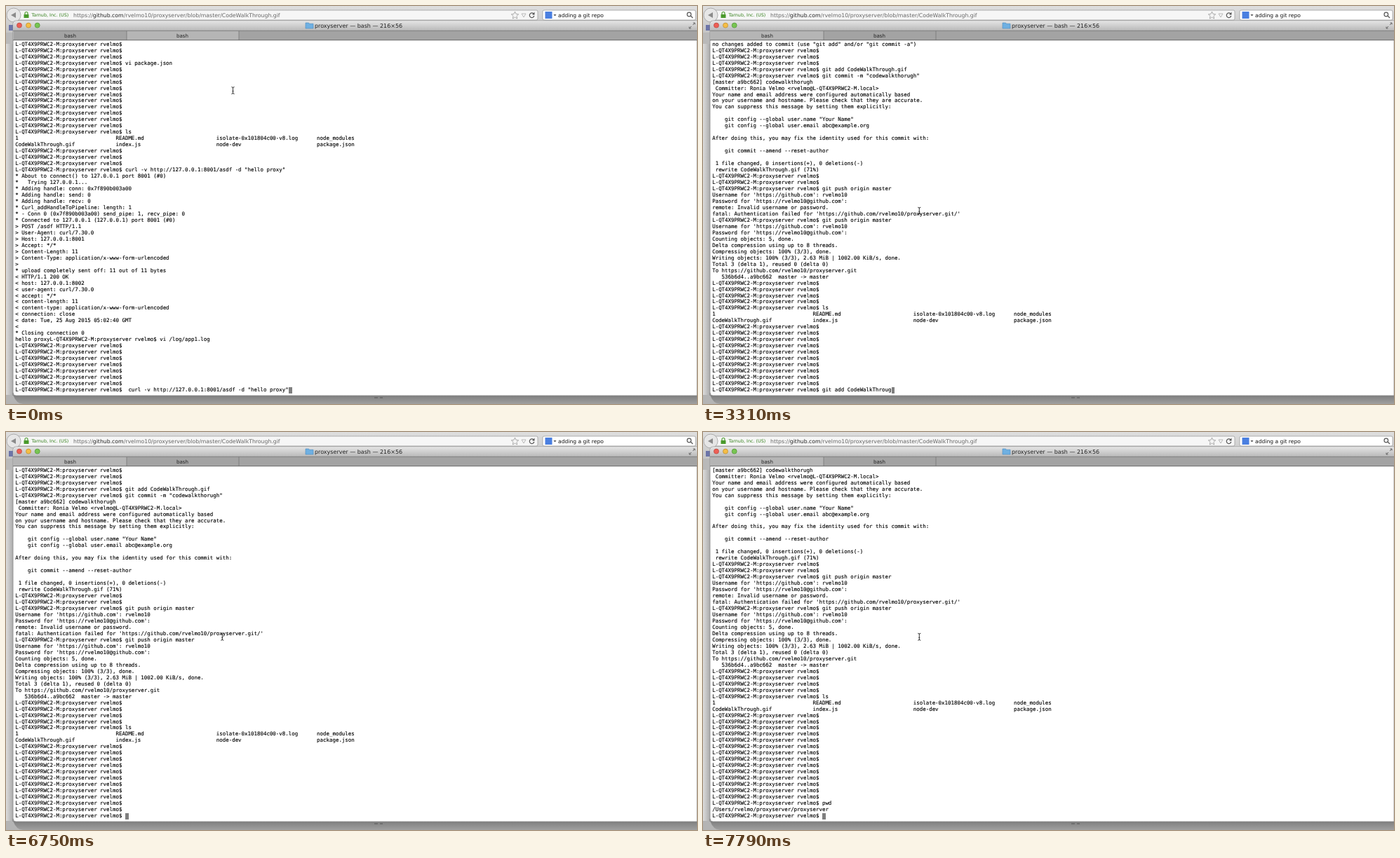
Recreate the animation shown at these times as an HTML page. Size 985 by 568 pixels, loop 8000 ms.

```html
<!DOCTYPE html>
<html lang="en">
<head>
<meta charset="utf-8">
<title>Terminal session</title>
<style>
  html, body { margin: 0; width: 100%; height: 100%; overflow: hidden; background: #ccc; }
  svg, pre, #cursor { position: absolute; }
  svg { left: 0; top: 0; font-family: "DejaVu Sans", sans-serif; text-rendering: geometricPrecision; }
  pre {
    left: 13.2px; top: 50.75px; margin: 0; color: #000;
    font: 7.44px/8.97px "DejaVu Sans Mono", monospace;
    text-rendering: geometricPrecision; font-variant-ligatures: none;
    -webkit-text-stroke: .12px #000;
  }
  #cursor { top: 543.5px; width: 4.7px; height: 9px; background: #7f7f7f; }
</style>
</head>
<body>
<svg width="985" height="568" viewBox="0 0 985 568">
  <defs>
    <linearGradient id="toolbar" x2="0" y2="1"><stop stop-color="#dedede"/><stop offset="1" stop-color="#c4c4c4"/></linearGradient>
    <linearGradient id="titlebar" x2="0" y2="1"><stop stop-color="#e4e4e4"/><stop offset="1" stop-color="#b9b9b9"/></linearGradient>
    <linearGradient id="side"><stop stop-color="#dcdcdc"/><stop offset="1" stop-color="#a8a8a8"/></linearGradient>
    <linearGradient id="under" x2="0" y2="1"><stop stop-color="#7c7c7c"/><stop offset="1" stop-color="#a0a0a0"/></linearGradient>
  </defs>

  <!-- browser behind the terminal -->
  <rect width="985" height="40" fill="url(#toolbar)"/>
  <rect y="38" width="10.5" height="530" fill="url(#side)"/>
  <rect y="38" width="10" height="16" fill="#b9b9b9"/>
  <rect x="4" y="27" width="6" height="8" fill="#6d75a8"/>
  <rect y="555" width="985" height="13" fill="#b4b4b4"/>
  <path d="M10 555H985V568H24q-9 0-14-13z" fill="url(#under)"/>
  <path d="M525 559h5M533 559h4" stroke="#666" stroke-width="1.5"/>
  <g fill="#f6f6f6" stroke="#a0a0a0" stroke-width=".8">
    <rect x="14" y="6" width="744" height="14" rx="2"/>
    <rect x="765" y="6" width="218" height="14" rx="2" fill="#fff"/>
    <circle cx="11" cy="13" r="10" fill="#e6e6e6"/>
  </g>
  <path d="M7 13l7-4v8z" fill="#8b8b8b"/>
  <path d="M27 12v-1.500a2 2 0 0 1 4 0V12" fill="none" stroke="#4a9a2c" stroke-width="1.2"/>
  <rect x="25.500" y="12" width="7" height="5" fill="#4a9a2c"/>
  <text x="36.500" y="15.300" font-size="6.4" fill="#35801c">Tarnub, Inc. (US)</text>
  <text x="96" y="15.600" font-size="7.75" fill="#666">https://<tspan fill="#222">github.com</tspan>/rvelmo10/proxyserver/blob/master/CodeWalkThrough.gif</text>
  <path d="M725.500 8l1.500 3.400 3.700.4-2.800 2.500.8 3.700-3.200-1.900-3.200 1.900.8-3.700-2.800-2.500 3.700-.4z" fill="none" stroke="#999" stroke-width=".8"/>
  <path d="M735 11h6l-3 5z" fill="none" stroke="#aaa" stroke-width=".8"/>
  <path d="M752 11a3.300 3.300 0 1 0 .8 3" fill="none" stroke="#555" stroke-width="1.2"/>
  <path d="M750 12.500h3.500v-4z" fill="#555"/>
  <rect x="768.500" y="8" width="10" height="10" fill="#4a7fe0"/>
  <path d="M780.500 12h4l-2 2.500z" fill="#555"/>
  <text x="787" y="15.500" font-size="7.6" fill="#111">adding a git repo</text>
  <g fill="none" stroke="#555" stroke-width="1.2"><circle cx="973.800" cy="12" r="2.800"/><path d="M976 14l3 3"/></g>

  <!-- terminal window -->
  <path d="M10 556V25q0-4 4-4H985V556H14q-4 0-4-4z" fill="#fff" stroke="#8a8a8a" stroke-width=".8"/>
  <path d="M10.400 35V25q0-3.600 4-3.600H985V35z" fill="url(#titlebar)"/>
  <g stroke-width=".7">
    <circle cx="19" cy="27.600" r="3.500" fill="#ee5f55" stroke="#b6423b"/>
    <circle cx="32" cy="27.600" r="3.500" fill="#f5bd45" stroke="#b98a2c"/>
    <circle cx="44.700" cy="27.600" r="3.500" fill="#78c552" stroke="#4f9235"/>
  </g>
  <path d="M427 32v-8h4.500l1 1.300h5.500V32z" fill="#6fb0e2" stroke="#4b8cc0" stroke-width=".6"/>
  <text x="440" y="30.600" font-size="8" fill="#222">proxyserver — bash — 216×56</text>
  <path d="M979 27l3-3m-2.500 0h2.500v2.500M977 29l-3 3m0-2.500v2.500h2.500" fill="none" stroke="#666"/>
  <rect x="10.400" y="35" width="975" height="14" fill="#a3a3a3"/>
  <rect id="activeTab" y="35.500" height="13.500" fill="#b5b5b5"/>
  <path d="M10 35.300H985M172 35.300V49M332 35.300V49" stroke="#777" stroke-width=".8"/>
  <path d="M10 48.700H985" stroke="#686868" stroke-width=".9"/>
  <g font-size="7.1" fill="#222" text-anchor="middle"><text x="91.500" y="45">bash</text><text x="251.500" y="45">bash</text></g>
  <g id="closeTab" fill="none" stroke="#555" stroke-width=".9"><circle cx="18.300" cy="42" r="3.300"/><path d="M17 40.700l2.600 2.600m0-2.600l-2.600 2.600"/></g>
  <rect id="scrollbar" x="979.500" y="539.500" width="4" height="15" rx="2" fill="#999"/>
</svg>
<pre id="screen"></pre>
<div id="cursor"></div>
<svg width="985" height="568" viewBox="0 0 985 568">
  <path id="ibeam" d="M-2-5q2 0 2 1.500q0-1.500 2-1.500M0-4V4M-2 5q2 0 2-1.500q0 1.500 2 1.500M-1 1h2" fill="none" stroke="#222" stroke-width=".9"/>
  <path id="arrow" d="M0 0V8.200l1.900-1.700 1.300 2.900 1.400-.6-1.300-2.800h2.500z" fill="#000" stroke="#fff" stroke-width=".6"/>
</svg>

<script>
const LOOP = 8000, ROWS = 56, CELL = 4.48;
const PROMPT = 'L-QT4X9PRWC2-M:proxyserver rvelmo$';
const ADD = 'git add CodeWalkThrough.gif';
const CURL = 'curl -v http://127.0.0.1:8001/asdf -d "hello proxy"';

const columns = (...words) => words.map(w => w.padEnd(32)).join('').trimEnd();
const LISTING = columns('1', 'README.md', 'isolate-0x101804c00-v8.log', 'node_modules') + '\n' +
  columns('CodeWalkThrough.gif', 'index.js', 'node-dev', 'package.json');
const idle = n => Array(n).fill('$').join('\n');
const transcript = text => text.replaceAll('$', () => PROMPT).split('\n');

const serverTab = transcript(`${idle(3)}
$ vi package.json
${idle(10)}
$ ls
${LISTING}
${idle(3)}
$ ${CURL}
* About to connect() to 127.0.0.1 port 8001 (#0)
*   Trying 127.0.0.1...
* Adding handle: conn: 0x7f890b003a00
* Adding handle: send: 0
* Adding handle: recv: 0
* Curl_addHandleToPipeline: length: 1
* - Conn 0 (0x7f890b003a00) send_pipe: 1, recv_pipe: 0
* Connected to 127.0.0.1 (127.0.0.1) port 8001 (#0)
> POST /asdf HTTP/1.1
> User-Agent: curl/7.30.0
> Host: 127.0.0.1:8001
> Accept: */*
> Content-Length: 11
> Content-Type: application/x-www-form-urlencoded
>
* upload completely sent off: 11 out of 11 bytes
< HTTP/1.1 200 OK
< host: 127.0.0.1:8002
< user-agent: curl/7.30.0
< accept: */*
< content-length: 11
< content-type: application/x-www-form-urlencoded
< connection: close
< date: Tue, 25 Aug 2015 05:02:40 GMT
<
* Closing connection 0
hello proxy$ vi /log/app1.log
${idle(7)}`);

const LOGIN = `$ git push origin master
Username for 'https://github.com': rvelmo10
Password for 'https://rvelmo10@github.com':`;

const gitTab = transcript(`no changes added to commit (use "git add" and/or "git commit -a")
${idle(3)}
$ ${ADD}
$ git commit -m "codewalkthorugh"
[master a9bc662] codewalkthorugh
 Committer: Ronia Velmo <rvelmo@L-QT4X9PRWC2-M.local>
Your name and email address were configured automatically based
on your username and hostname. Please check that they are accurate.
You can suppress this message by setting them explicitly:

    git config --global user.name "Your Name"
    git config --global user.email abc@example.org

After doing this, you may fix the identity used for this commit with:

    git commit --amend --reset-author

 1 file changed, 0 insertions(+), 0 deletions(-)
 rewrite CodeWalkThrough.gif (71%)
${idle(2)}
${LOGIN}
remote: Invalid username or password.
fatal: Authentication failed for 'https://github.com/rvelmo10/proxyserver.git/'
${LOGIN}
Counting objects: 5, done.
Delta compression using up to 8 threads.
Compressing objects: 100% (3/3), done.
Writing objects: 100% (3/3), 2.63 MiB | 1002.00 KiB/s, done.
Total 3 (delta 1), reused 0 (delta 0)
To https://github.com/rvelmo10/proxyserver.git
   536b6d4..a9bc662  master -> master
${idle(4)}
$ ls
${LISTING}
${idle(10)}`);

// Number of evenly spaced steps taken so far between two times.
const stepsAt = (t, start, end, count) =>
  t < start ? 0 : Math.min(count, 1 + Math.floor((t - start) / (end - start) * (count - 1) + 1e-6));

function terminalAt(t) {
  if (t < 620) return [...serverTab, `${PROMPT}  ${CURL}`];
  const fast = stepsAt(t, 3310, 4350, 8);
  const erased = stepsAt(t, 2410, 2860, 4) + (fast && 1 + Math.round((fast - 1) * 13 / 7)) +
    Math.round(stepsAt(t, 4500, 5100, 5) * 1.8);
  const lines = [...gitTab, ...Array(stepsAt(t, 6750, 7200, 4)).fill(PROMPT)];
  const pwd = stepsAt(t, 7500, 7790, 3);
  if (pwd === 3) lines.push(`${PROMPT} pwd`, '/Users/rvelmo/proxyserver/proxyserver');
  const command = ADD.slice(0, ADD.length - erased) + ['', 'pw', 'pwd', ''][pwd];
  return [...lines, `${PROMPT} ${command}`];
}

// Pointer positions: start time, x, y
const POINTER = [[0, 323.5, 120.5], [150, 222, 84], [330, 114.5, 44], [770, 150, 86], [910, 246, 212], [1060, 308.3, 292.3]];

const el = id => document.getElementById(id);
const show = (id, on) => el(id).setAttribute('opacity', +on);

function draw(t) {
  const lines = terminalAt(t).slice(-ROWS);
  const text = lines.join('\n');
  if (el('screen').textContent !== text) el('screen').textContent = text;
  el('cursor').style.left = 13.2 + lines.at(-1).length * CELL + 'px';

  el('activeTab').setAttribute('x', t < 620 ? 172 : 10.4);
  el('activeTab').setAttribute('width', t < 620 ? 160 : 161.6);
  show('scrollbar', t < 770 || t >= 1810 ? 0 : t < 1660 ? 0.8 : 0.4);

  const [, x, y] = POINTER.findLast(p => p[0] <= t);
  const overTab = y < 49;
  for (const id of ['ibeam', 'arrow']) el(id).setAttribute('transform', `translate(${x} ${y})`);
  show('ibeam', !overTab);
  show('arrow', overTab);
  show('closeTab', overTab);
}

const begin = performance.now();
function tick() {
  draw((performance.now() - begin) % LOOP);
  requestAnimationFrame(tick);
}
tick();
</script>
</body>
</html>
```
